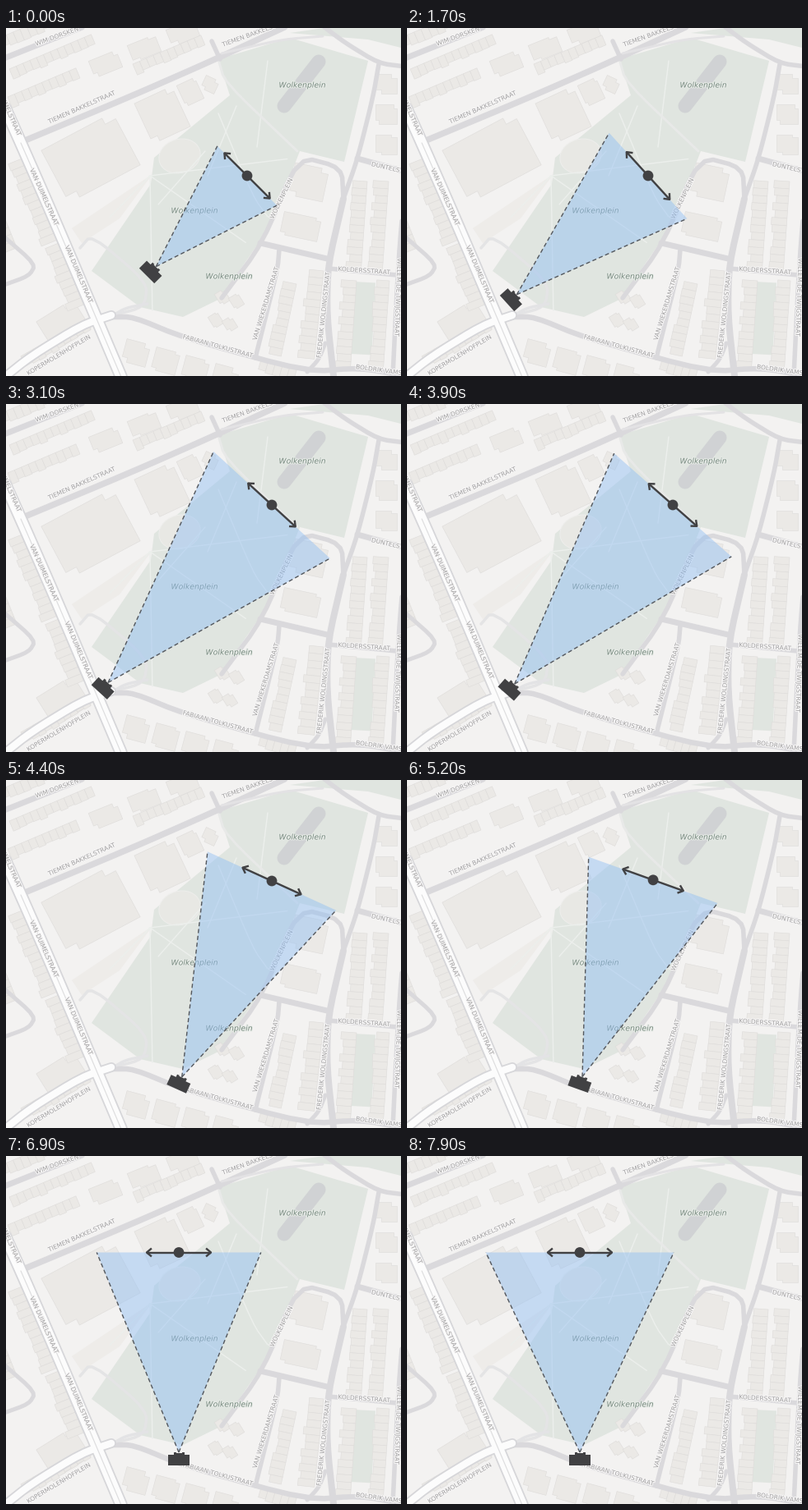
Write a matplotlib script that moves like this. It is 480 px wide and 424 px high and loops after 8000 ms.

```python
import math
import random
import numpy as np
import matplotlib.pyplot as plt
from matplotlib.animation import FuncAnimation
from matplotlib.collections import PolyCollection
from matplotlib.patches import Circle, Ellipse, Polygon
from matplotlib.patheffects import withStroke

W, H, DPI = 480, 424, 100
PX = 72 / DPI
LAND, PARK, HOUSE, EDGE = "#f3f2f1", "#e0e5e0", "#ebe9e6", "#dfdddb"
STREET, CASING, MAIN, DARK = "#dad9dc", "#d6d6d9", "#fcfcfc", "#414143"

random.seed(4)
plt.rcParams["font.family"] = "DejaVu Sans"
fig = plt.figure(figsize=(W / DPI, H / DPI), dpi=DPI, facecolor=LAND)
ax = fig.add_axes([0, 0, 1, 1])
ax.set_xlim(0, W)
ax.set_ylim(H, 0)
ax.axis("off")


def place(pts, x, y, deg):
    """Turn local points clockwise on screen and move them to (x, y)."""
    c, s = math.cos(math.radians(deg)), math.sin(math.radians(deg))
    return np.array(pts, float) @ np.array([[c, s], [-s, c]]) + (x, y)


def rounded(pts):
    """Cut the corners of an open line twice."""
    p = np.array(pts, float)
    for _ in range(2):
        a, b = p[:-1], p[1:]
        cut = np.stack([0.8 * a + 0.2 * b, 0.2 * a + 0.8 * b], 1).reshape(-1, 2)
        p = np.vstack([p[:1], cut, p[-1:]])
    return p


def road(pts, w=5.5, color=STREET, z=3):
    ax.plot(*rounded(pts).T, color=color, lw=w * PX, zorder=z,
            solid_capstyle="round", solid_joinstyle="round")


def area(pts, color):
    ax.add_patch(Polygon(pts, fc=color, ec="none", zorder=1))


cells = []


def terrace(x, y, deg, length, depth, step=9):
    """A street of narrow houses, built to the right of the walk."""
    for left in range(0, int(length), step):
        d = depth * random.uniform(0.8, 1.05)
        box = [(left, 0), (left + step, 0), (left + step, d), (left, d)]
        cells.append(place(box, x, y, deg))


def hall(x, y, w, h, deg):
    """A large building with two opposite corners notched."""
    w, h = w / 2, h / 2
    nx, ny = w * random.uniform(0.2, 0.6), h * random.uniform(0.2, 0.5)
    half = [(-w, -h), (w - nx, -h), (w - nx, ny - h), (w, ny - h)]
    cells.append(place(half + [(-a, -b) for a, b in half], x, y, deg))


def label(text, x, y, angle, ha="center"):
    ax.text(x, y, text, fontsize=7.5 * PX, color="#a2a1a2", rotation=angle,
            ha=ha, va="center", rotation_mode="anchor", zorder=5,
            path_effects=[withStroke(linewidth=2.2 * PX, foreground="#f6f5f5")])


# Parks, plaza and pond
area([(258, 38), (345, 12), (440, 40), (411, 163), (357, 150), (322, 240),
      (260, 330), (215, 352), (163, 340), (104, 296), (176, 190), (180, 158),
      (272, 82)], PARK)
area([(345, 6), (400, -2), (480, -2), (480, 24), (440, 14)], PARK)
area(place([(0, 0), (28, 0), (28, 88), (0, 88)], 421, 309, 3), PARK)
area([(80, 244), (178, 178), (138, 232), (92, 262)], "#eeece9")
ax.add_patch(Ellipse((211, 156), 51, 41, angle=-17, fc="#e8e8e4",
                     ec="#eeeeec", lw=PX, zorder=2))
road([(380, 41), (338, 95)], 17, "#d0d2d4", 2)

# Footpaths fan out from the corner of the plaza
hub = np.array([175, 180])
for deg, length in ((-7, 168), (35, 142), (89, 164), (134, 70)):
    road([hub, place([(length, 0)], *hub, deg)[0]], 1.5, "#ecefec", 2)
for k in range(3):
    road([(242 + 38 * k, 150 - 55 * k), (185 + 60 * k, 215 - 35 * k)],
         1.5, "#ecefec", 2)
road([(258, 104), (300, 205), (318, 230)], 1.5, "#ecefec", 2)
road([(258, 38), (266, 66), (354, 150)], 3, "#e8e9e8", 2)
road([(90, 268), (104, 252), (172, 310), (168, 340), (130, 350)], 3.5,
     "#e4e4e5", 2)

# Buildings
hall(103, 158, 98, 72, -28)
hall(190, 106, 50, 54, -25)
hall(224, 78, 24, 28, -25)
hall(248, 69, 18, 17, 25)
hall(70, 362, 52, 42, -32)
hall(368, 188, 42, 40, 12)
hall(358, 242, 46, 28, 12)
for k in range(3):
    hall(121 + 47 * k, 44 - 19 * k, 36, 22, -22)
    hall(462, 68 + 37 * k, 26, 24, 0)
for k in range(4):
    hall(158 + 36 * k, 396 + 10 * k, 30, 28, 15)
    hall(255 + 17 * (k % 2) + 8 * (k // 2), 356 + 5 * (k % 2) - 28 * (k // 2),
         13, 16, -32)

# Terraces
for x, y, length in ((4, 50, 100), (2, 84, 90), (154, 44, 85), (-8, 12, 70)):
    terrace(x, y, -23, length, 14)
for x, y, length in ((22, 158, 104), (64, 262, 76), (-24, 176, 96)):
    terrace(x, y, 68, length, 20)
terrace(18, 400, -30, 85, 16)
terrace(310, 404, 16, 40, 14)
terrace(386, 296, 96, 104, 20)
terrace(353, 312, 102, 84, 17)
for k in range(2):
    for x in (439 - 13 * k, 465 + k):
        terrace(x, 187 + 121 * k, 94, 100, 18)
ax.add_collection(PolyCollection(cells, facecolors=HOUSE, edgecolors=EDGE,
                                 linewidths=0.6 * PX, zorder=2))

# Streets
road([(-5, 38), (45, 18), (100, -4)], 7)
road([(16, 140), (150, 84), (250, 40), (345, -4)], 7.5)
road([(250, 16), (260, 38)])
road([(262, 31), (335, 14), (385, 10)], 3, "#e3e2e4")
road([(383, -4), (412, 18), (453, 43), (485, 47)])
road([(453, 44), (446, 84), (427, 160), (410, 208)])
road([(427, 159), (485, 175)], 7)
road([(262, 329), (312, 262), (355, 156), (408, 170), (410, 208)])
road([(410, 208), (391, 290), (390, 350), (398, 424)], 8)
road([(309, 262), (390, 281)], 7)
road([(332, 270), (330, 294), (303, 402)])
road([(392, 293), (485, 302)])
road([(485, 190), (477, 280), (470, 424)])
road([(128, 352), (155, 352), (215, 377), (366, 419), (430, 414), (485, 424)], 6.5)
road([(366, 419), (380, 404), (388, 384)], 5)
road([(-5, 252), (36, 288), (28, 302), (-5, 314)], 5)
road([(130, 350), (146, 341), (172, 336)], 3.5, "#e3e3e5")

avenue = [(-10, 78), (18, 140), (60, 236), (142, 430)]
bend = [(-5, 428), (30, 400), (92, 362), (128, 350)]
for w, color in ((16, CASING), (12.5, MAIN)):
    road(bend, w - 4, color, 4)
    road(avenue, w, color, 4)
road(avenue[1:], 1.2, "#dededf", 4)

# Names
for text, x, y, angle, ha in (
        ("TIEMEN BAKKELSTRAAT", 92, 97, 24, "center"),
        ("TIEMEN BAKKELSTRAAT", 263, 21, 20, "left"),
        ("WIM DORSKEN", 36, 20, 20, "left"),
        ("VAN DUIMELSTRAAT", 46, 206, -66, "center"),
        ("VAN DUIMELSTRAAT", 88, 300, -67, "center"),
        ("VAN DUIMELSTRAAT", 16, 131, -66, "right"),
        ("KOPERMOLENHOFPLEIN", 64, 399, 31, "center"),
        ("FABIAAN TOLKUSTRAAT", 257, 388, -15.5, "center"),
        ("VAN WIEKERDAMSTRAAT", 316, 336, 73, "center"),
        ("FREDERIK WOLDINGSTRAAT", 386, 350, 84, "center"),
        ("KOLDERSSTRAAT", 435, 296, -4, "center"),
        ("WILLEM DE TWIJGSTRAAT", 476, 328, -92, "center"),
        ("WOLKENPLEIN", 335, 208, 64, "center"),
        ("DUNTELSTRAAT", 444, 166, -13, "left"),
        ("BOLDRIK VAMSTRAAT", 425, 413, -8, "left")):
    label(text, x, y, angle, ha)
for x, y in ((360, 70), (229, 223), (271, 303)):
    ax.text(x, y, "Wolkenplein", fontsize=9.3 * PX, style="italic",
            color="#778a7f", ha="center", va="center", zorder=5,
            path_effects=[withStroke(linewidth=2 * PX, foreground="#e8ece8")])

# Moving parts
view = Polygon([(0, 0)] * 3, fc=(0.56, 0.745, 0.955, 0.46), ec="none", zorder=6)
camera = Polygon([(0, 0)] * 3, fc=DARK, ec="none", zorder=9)
dot = Circle((0, 0), 6.4, fc=DARK, ec="none", zorder=9)
for patch in (view, camera, dot):
    ax.add_patch(patch)
sides = [ax.plot([], [], color="#54585e", lw=1.4 * PX, zorder=7,
                 dashes=(3.6, 2.4), dash_capstyle="butt")[0] for _ in range(2)]
strokes = [ax.plot([], [], color=DARK, lw=2.4 * PX, zorder=8,
                   solid_joinstyle="round")[0] for _ in range(3)]
HALF = [(13, -7), (13, 6), (6.5, 6), (6.5, 9.5), (3.5, 9.5), (3.5, 8.5)]
BODY = np.array(HALF + [(-x, y) for x, y in reversed(HALF)])
STOPS = np.array([(176, 297), (168, 306), (118, 346), (210, 370)], float)
PULL = np.array([132, 313.5])
GOALS = np.array([(293, 180), (323, 123), (210, 117.5)])


def smooth(t, start=0, end=1):
    q = min(max((t - start) / (end - start), 0), 1)
    return q * q * (3 - 2 * q)


def drag(t, start, end):
    q = min(max((t - start) / (end - start), 0), 1)
    return smooth(1 - (1 - q) ** 2)


def mix(a, b, u):
    return a + (b - a) * u


def camera_at(t):
    if t <= 1100:
        return mix(STOPS[0], STOPS[1], smooth(t, 500, 800))
    if t <= 2000:
        u = smooth(t, 1100, 2000)
        return mix(mix(STOPS[1], PULL, u), mix(PULL, STOPS[2], u), u)
    return mix(STOPS[2], STOPS[3], smooth(t, 3800, 4400))


def goal_at(t):
    first = mix(GOALS[0], GOALS[1], drag(t, 2500, 3120))
    return mix(first, GOALS[2], drag(t, 5100, 5720))


def update(i):
    t = i * 100
    pos, goal = camera_at(t), goal_at(t)
    ahead = (goal - pos) / math.hypot(*(goal - pos))
    across = np.array([-ahead[1], ahead[0]])
    tip = pos + 9 * ahead
    spread = mix(0.327, 0.469, smooth(t, 6400, 7300))
    half = across * spread * math.hypot(*(goal - tip))
    ends = (goal - half, goal + half)
    view.set_xy([tip, *ends])
    camera.set_xy(pos + BODY @ np.array([across, ahead]))
    dot.center = tuple(goal)
    for line, end in zip(sides, ends):
        line.set_data(*zip(tip, end))
    strokes[0].set_data(*zip(goal - 38 * across, goal + 38 * across))
    for line, s in zip(strokes[1:], (-1, 1)):
        head = goal + s * 39 * across
        back = head - s * 5 * across
        line.set_data(*zip(back + 4.2 * ahead, head, back - 4.2 * ahead))
    return [view, camera, dot, *sides, *strokes]


anim = FuncAnimation(fig, update, frames=80, interval=100, repeat=True,
                     repeat_delay=0, blit=False)
plt.show()
```
